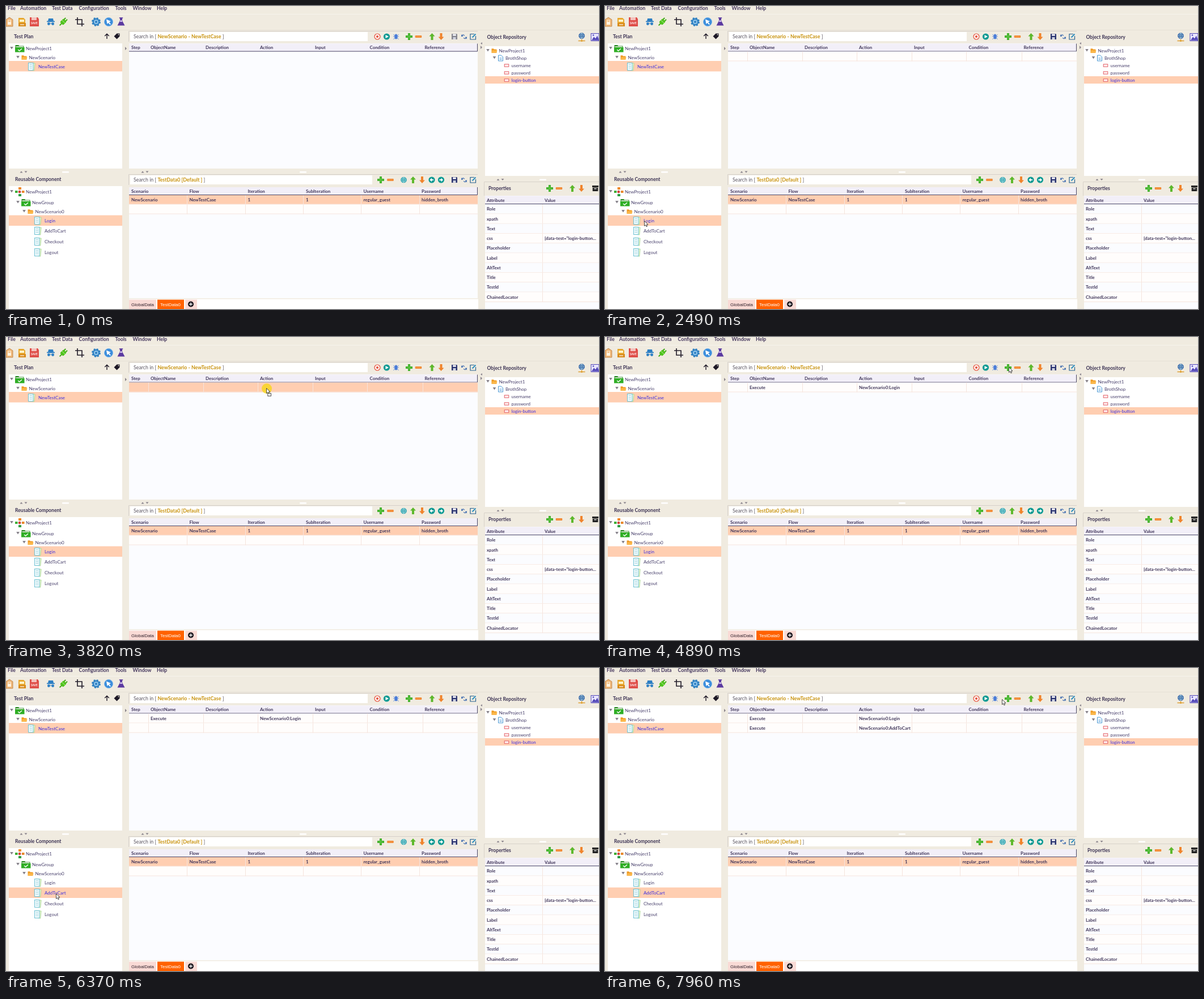
Animation, 1046 px wide and 535 px high, one loop 8000 ms. Source, as an HTML page:

```html
<!DOCTYPE html>
<html lang="en">
<head>
<meta charset="utf-8">
<title>Test designer</title>
<style>
html, body { margin: 0; width: 100%; height: 100%; overflow: hidden; background: #f0ebe0; }
svg { display: block; width: 1046px; height: 535px; font: 8px Lato, "Open Sans", sans-serif; }
text { fill: #473f6b; white-space: pre; }
.b { font-weight: 700; font-size: 7.9px; fill: #40365a; }
.menu { font-weight: 700; font-size: 8.7px; fill: #43355c; }
.head { font-weight: 700; font-size: 8.6px; fill: #3c3354; }
.find { font-size: 8.8px; fill: #5a5560; }
.find tspan { font-weight: 700; fill: #c8920c; }
.on { fill: #3a2ee0; }
.tab { font: 8px "Liberation Sans", Arial, sans-serif; fill: #33222c; }
.tab.hot { fill: #fff; }

.anim { animation: 8s step-end infinite; }
#pointer { animation-name: move; }
#drag { animation-name: drag; }
#badge { animation-name: badge; }
#saveOff { animation-name: saveOff; }
#row1 { animation-name: row1; }
#row2 { animation-name: row2; }
#drop1 { animation-name: drop1; }
#drop2 { animation-name: drop2; }
#call1 { animation-name: call1; }
#call2 { animation-name: call2; }
#pick1 { animation-name: pick1; }
#pick2 { animation-name: pick2; }

@keyframes move {
  0% { transform: translate(1100px, 600px); }
  6.5% { transform: translate(991px, 512px); }
  7.375% { transform: translate(752px, 167px); }
  9.5% { transform: translate(691px, 78px); }
  12.125% { transform: translate(692px, 53px); }
  14.125% { transform: translate(717px, 53px); }
  18.5% { transform: translate(714px, 53px); }
  20.75% { transform: translate(713px, 53px); }
  23.75% { transform: translate(127px, 386px); }
  31.125% { transform: translate(69px, 379px); }
  39.125% { transform: translate(71px, 379px); }
  40.75% { transform: translate(374px, 165px); }
  43.125% { transform: translate(419px, 108px); }
  45.625% { transform: translate(451px, 97px); }
  47.75% { transform: translate(459px, 90px); }
  52.125% { transform: translate(520px, 82px); }
  53.5% { transform: translate(606px, 62px); }
  55.75% { transform: translate(668px, 57px); }
  57% { transform: translate(703px, 54px); }
  58.25% { transform: translate(712px, 53px); }
  66.125% { transform: translate(371px, 176px); }
  68.375% { transform: translate(252px, 264px); }
  69.375% { transform: translate(180px, 317px); }
  71.25% { transform: translate(150px, 345px); }
  72.5% { transform: translate(125px, 366px); }
  73.75% { transform: translate(107px, 383px); }
  75% { transform: translate(96px, 393px); }
  76.375% { transform: translate(90px, 397px); }
  77.75% { transform: translate(88px, 398px); }
  80.875% { transform: translate(90px, 398px); }
  81.75% { transform: translate(318px, 236px); }
  82.875% { transform: translate(447px, 145px); }
  87.5% { transform: translate(480px, 106px); }
  93.5% { transform: translate(497px, 104px); }
  94.6% { transform: translate(561px, 88px); }
  95.75% { transform: translate(628px, 72px); }
  97% { transform: translate(672px, 61px); }
  98.25% { transform: translate(693px, 56px); }
  99.5%, 100% { transform: translate(700px, 55px); }
}
@keyframes drag {
  0%, 50.75%, 92.375%, 100% { opacity: 0; }
  39.125%, 80.875% { opacity: 1; }
}
@keyframes badge {
  0%, 50.75%, 92.375%, 100% { opacity: 0; }
  40.75%, 81.75% { opacity: 1; }
}
@keyframes saveOff { 0% { opacity: 1; } 23.75%, 100% { opacity: 0; } }
@keyframes row1 { 0% { opacity: 0; } 23.75%, 100% { opacity: 1; } }
@keyframes row2 { 0% { opacity: 0; } 62.75%, 100% { opacity: 1; } }
@keyframes drop1 { 0%, 52.125%, 100% { opacity: 0; } 47.75% { opacity: 1; } }
@keyframes drop2 { 0%, 93.5%, 100% { opacity: 0; } 87.5% { opacity: 1; } }
@keyframes call1 { 0% { opacity: 0; } 50.75%, 100% { opacity: 1; } }
@keyframes call2 { 0% { opacity: 0; } 92.375%, 100% { opacity: 1; } }
@keyframes pick1 { 0% { opacity: 1; } 79.625%, 100% { opacity: 0; } }
@keyframes pick2 { 0% { opacity: 0; } 79.625%, 100% { opacity: 1; } }
</style>
</head>
<body>
<svg id="stage" viewBox="0 0 1046 535"></svg>
<script>
const PEACH = '#ffceb1', GRID = '#f5e4dd', BLANK = '#fbfcff', ROW = '#fffdfc';
const GREEN = '#3fae2a', ORANGE = '#f0842c', TEAL = '#0c9a93', BLUE = '#2d7fc4', NAVY = '#2b3470';

const rect = (x, y, w, h, fill, more = '') =>
  `<rect x="${x}" y="${y}" width="${w}" height="${h}" fill="${fill}" ${more}/>`;
const path = (d, fill, more = '') => `<path d="${d}" fill="${fill}" ${more}/>`;
const line = (d, stroke, w = 1, more = '') =>
  `<path d="${d}" fill="none" stroke="${stroke}" stroke-width="${w}" ${more}/>`;
const dot = (x, y, r, fill, more = '') => `<circle cx="${x}" cy="${y}" r="${r}" fill="${fill}" ${more}/>`;
const text = (x, cy, s, cls = '') => `<text x="${x}" y="${cy + 2.8}" class="${cls}">${s}</text>`;
const part = (id, body) => `<g id="${id}" class="anim">${body}</g>`;
const at = (x, y, body) => `<g transform="translate(${x} ${y})">${body}</g>`;
const turn = (deg, body) => `<g transform="rotate(${deg})">${body}</g>`;

const arrow = (dir, color) => path('M0-6L5-.5H2V6H-2V-.5H-5Z', color, `transform="scale(1 ${dir})"`);
const disc = deg => dot(0, 0, 5.6, TEAL) + turn(deg, path('M-3-1H0V-3.5L3.5 0L0 3.5V1H-3Z', '#fff'));
const floppy = c => path('M-5-5H4L5-4V5H-5Z', c) + rect(-2.8, -4.5, 5.6, 3.2, '#f4f4fa') + rect(-2.5, 1, 5, 4, '#cfd2e0');
const globe = c => dot(0, 0, 5.3, c) +
  line('M-5 0H5M0-5V5M-4-2.8H4M-4 2.8H4M0-5C-4-2-4 2 0 5C4 2 4-2 0-5', '#c9f0ef', .6);

const icons = {
  plus: path('M-2-6H2V-2H6V2H2V6H-2V2H-6V-2H-2Z', GREEN) + line('M-4.5 0H4.5M0-4.5V4.5', '#66cc4c', 1.2),
  minus: rect(-5.7, -2, 11.4, 4, ORANGE, 'rx=".8"') + line('M-4.5 0H4.5', '#f8a75c', 1),
  up: arrow(1, '#5db82c'),
  down: arrow(-1, ORANGE),
  left: disc(180),
  right: disc(0),
  record: dot(0, 0, 5, '#fff3ef', 'stroke="#e4503c" stroke-width="1.2"') + dot(0, 0, 2, '#e4503c'),
  play: dot(0, 0, 5.6, TEAL) + path('M-2-3L3.5 0L-2 3Z', '#fff'),
  bug: line('M-4.5-4L-2-1M4.5-4L2-1M-5 0H5M-4.5 5L-2 2M4.5 5L2 2', '#5585dd', .9) +
    '<ellipse rx="2.6" ry="4.5" fill="#4a7cd8"/>',
  save: floppy(NAVY),
  saveOff: floppy('#85858e'),
  refresh: line('M-3.8-1C-3.5-4-.5-3.5 .8-1.5M3.8 1.5C3.5 4.5 .5 4-.8 2', '#3a68ae', 1.2) +
    path('M-4.5-4L-1.5-.5L-5 0ZM4.5 4.5L1.5 1L5 .5Z', '#3a68ae'),
  edit: line('M2-4.5H-5V5H4.5V-1', '#27618f', 1.2) + line('M-1.5 1.5L4.5-4.5', '#2e8fc0', 2),
  globe: globe('#1c98a8'),
  web: at(0, -2, globe('#1e4f9c')) + line('M0 4V7M-6 7H6', '#e0a030', 1.4) + dot(0, 7, 1.5, '#e0a030'),
  picture: rect(-6, -6, 14, 13, '#e9e6ff', 'stroke="#5247b8"') + path('M-5 6L-1 0L2 3L5-2L8 6Z', '#5247b8') + dot(-2, -3, 1.3, '#5247b8'),
  archive: rect(-5.5, -5, 11, 3, '#222') + rect(-4.8, -1.3, 9.6, 6.3, '#222') + rect(-2, 0, 4, 1.3, '#fff'),
  folder: path('M-4.5-3.8H-1L0-2.6H4.5V3.8H-4.5Z', '#ef9a22') + path('M-3-.8H5.5L4 3.8H-4.5Z', '#fbb74a'),
  project: path('M-7.5-6H-2L-.5-4.5H7.5V6H-7.5Z', '#23861c') + rect(-6.5, -3.8, 13, 1.6, '#e9f5e4') +
    rect(-8, -2, 16.5, 8.5, '#2fae25') + line('M-2.8 2L-.5 4.2L4 .2', '#fff', 1.4),
  sheet: turn(6, rect(-3.5, -6.5, 9, 13, '#e6f5d3', 'stroke="#9bd283" stroke-width=".7"')) +
    rect(-5.5, -6.5, 8.5, 13, '#f1fafc', 'stroke="#62bdd2" stroke-width=".9"') +
    line('M-3.5-3.5H1M-3.5-.5H1M-3.5 2.5H1', '#8ccbd9', .8),
  page: path('M-4-5H1L4-2V5H-4Z', '#f4faff', 'stroke="#3b8fd0" stroke-width=".9"') + line('M-2 0H2M-2 2.5H2', '#3b8fd0', .8),
  field: rect(-3.8, -2.2, 7.6, 4.4, '#ffeeee', 'stroke="#e0515a" stroke-width=".9"'),
  cluster: line('M0-4V5M-4 0H5', '#aaa', .7) + rect(-2, -8, 5, 4, '#ef8a2a') + rect(-8, -2, 4.5, 4, '#3cae35') +
    rect(-2, -2, 4, 4, '#d8433c') + rect(4, -2, 4.5, 4, '#e9892c') + rect(-2, 4, 5, 4, '#2f9e43'),
  tri: path('M-2.8-2H2.8L0 2.5Z', '#858089'),
  lockDoc: path('M-6-4L0-8L6-4V8H-6Z', '#efb778', 'stroke="#b97a3c" stroke-width=".8"') +
    rect(-3, 0, 6, 5, '#fff3df') + line('M-2 0V-3H2V0', '#fff3df', 1.2),
  openDoc: path('M-6-7H3L6-4V8H-6Z', '#e8a82e') + rect(-4, -4, 8, 4, '#fff3c8') + rect(-6, 2, 13, 6, '#d98c1c') + line('M-3 5H4', '#fff', 1.2),
  saveAll: path('M-8-8H6L8-5V8H-8Z', '#df4f49') + rect(-5, -8, 9, 5, '#f3c2bd') +
    '<text x="-6" y="4" style="font:700 4.8px Lato,sans-serif;fill:#fff">SAVE</text>',
  spy: path('M-4-6H4L5-1H-5Z', BLUE) + rect(-7, -1.5, 14, 1.8, BLUE) + dot(-3.6, 3.5, 2.4, BLUE) + dot(3.6, 3.5, 2.4, BLUE) + line('M-2 3H2', BLUE),
  plug: turn(45, rect(-4, -4.5, 8, 9, '#4fc41c', 'rx="2"') + line('M-4-.5H4', '#d6f3c6', .8) +
    line('M-2-8V-4M2-8V-4M0 4V9', '#41ab18', 2)),
  crop: line('M-4-8V4H8M-8-4H4V8', '#211c28', 1.6),
  gear: dot(0, 0, 6.4, '#2f80c2', 'stroke="#2f80c2" stroke-width="3" stroke-dasharray="2.8 2.23"') +
    dot(0, 0, 4, '#8fc4ea') + dot(0, 0, 2, '#2f80c2'),
  pointer: dot(0, 0, 7.6, '#3b8ddb', 'stroke="#82b9ea" stroke-width=".9"') +
    path('M-4-4.5L4-1L1 .5L4 4L2.5 5L-.5 1.8L-2.5 4Z', '#fff'),
  flask: path('M-2-7H2V-2L6.5 6.5H-6.5L-2-2Z', '#5b3aa0') + line('M-3.2-7H3.2', '#5b3aa0', 1.6) + path('M-1-3H1L2 0H-2Z', '#d9c9f2'),
  back: line('M0 4.5V-4M-3.8-.5L0-4.3L3.8-.5', '#1d1826', 1.4),
  tag: path('M-5 0L0-5H5V0L0 5Z', '#1d1826') + dot(3, -3, .9, '#f0ebe0'),
  add: dot(0, 0, 5, '#17131c') + line('M-3 0H3M0-3V3', '#fff', 1.3)
};
const icon = (name, x, y) => at(x, y, icons[name]);
const iconRow = (y, list) => Object.entries(list).map(([name, x]) => icon(name, x, y)).join('');

const label = (cls, y, list) => list.map(([x, s]) => text(x, y, s, cls)).join('');
const splitter = (x, y, handle) =>
  path(`M${x - 2.5} ${y + 1.5}h5l-2.5-3zM${x + 5.5} ${y - 1.5}h5l-2.5 3z`, '#8a848c') +
  rect(handle, y - 1, 12, 2.4, '#fff', 'rx="1"');
const gridRow = (y, h, cols, fill) =>
  rect(217, y, 615, h, fill) + line(`M217 ${y + h - .5}H832` + cols.map(x => `M${x} ${y}V${y + h}`).join(''), GRID);
const tableHead = (y, cols) =>
  rect(217, y, 615, 14, '#f2eff8') + line(`M217 ${y + 13.5}H831.5V${y}`, '#4a4766') +
  label('b', y + 7, cols);
const search = (y, w, name) =>
  line(`M216.5 ${y + 17}V${y - 1.5}H832`, '#d5cfca') + rect(219, y, w, 16, '#fff') +
  text(225, y + 8, `Search in [ <tspan>${name}</tspan> ]`, 'find');

// Distance from an icon to its label and to its expander.
const labelGap = { project: 11, cluster: 11, sheet: 12, folder: 8.5, page: 8.5, field: 8.5 };
const openGap = { project: 14, cluster: 14, folder: 11, page: 11 };
const node = (x, y, kind, s, cls) =>
  (openGap[kind] ? icon('tri', x - openGap[kind], y - 1) : '') + icon(kind, x, y) + text(x + labelGap[kind], y, s, cls);

const stepCols = [251.5, 348.5, 444.5, 541.5, 637.5, 735.5];
const dataCols = [319.5, 422.5, 524.5, 626.5, 729.5];
const call = (y, s) => text(255, y, 'Execute', 'b') + text(448, y, 'NewScenario0:' + s, 'b');

const topBar =
  label('menu', 4.5, [[3, 'File'], [25, 'Automation'], [81, 'Test Data'], [128.5, 'Configuration'], [192.5, 'Tools'], [223.5, 'Window'], [266, 'Help']]) +
  line('M0 14.5H1046', '#f7f4ec') + line('M0 42.5H1046', '#e6e0d5') +
  iconRow(28, { lockDoc: 6, openDoc: 28, saveAll: 50, spy: 79, plug: 101, crop: 130, gear: 159, pointer: 181, flask: 203 });

const testPlan =
  text(14, 54, 'Test Plan', 'head') + iconRow(53.5, { back: 178, tag: 195.5 }) +
  rect(5, 66, 200, 221, '#fff') + rect(5, 97, 200, 18.5, PEACH) +
  node(24, 75, 'project', 'NewProject1') +
  node(32, 91, 'folder', 'NewScenario') +
  node(45, 107, 'sheet', 'NewTestCase', 'on') +
  splitter(27, 293, 99);

const leaf = (y, s, cls) => node(56, y, 'sheet', s, cls);
const picked = (y, s) => rect(5, y - 9.5, 200, 18.5, PEACH) + leaf(y, s, 'on');
const components =
  text(16, 306, 'Reusable Component', 'head') + rect(5, 318, 200, 217, '#fff') +
  node(24, 328, 'cluster', 'NewProject1') +
  node(35, 347, 'project', 'NewGroup') +
  node(43, 363, 'folder', 'NewScenario0') +
  leaf(379, 'Login') + leaf(397, 'AddToCart') + leaf(416, 'Checkout') + leaf(435, 'Logout') +
  part('pick1', picked(379, 'Login')) +
  part('pick2', picked(397, 'AddToCart'));

const steps =
  search(46, 419, 'NewScenario - NewTestCase') +
  iconRow(54, { record: 655, play: 671.5, bug: 688, plus: 711, minus: 727.5, up: 751.5, down: 767.5, save: 791, refresh: 808, edit: 824 }) +
  part('saveOff', rect(785, 48, 12, 12, '#f0ebe0') + icon('saveOff', 791, 54)) +
  rect(217, 66, 615, 221, BLANK) +
  tableHead(66.5, [[221, 'Step'], [255, 'ObjectName'], [352, 'Description'], [448, 'Action'], [545, 'Input'], [641.5, 'Condition'], [738.5, 'Reference']]) +
  part('row1', gridRow(80.5, 17, stepCols, ROW)) +
  part('row2', gridRow(97.5, 17, stepCols, ROW)) +
  part('drop1', gridRow(80.5, 17, stepCols, PEACH)) +
  part('drop2', gridRow(97.5, 17, stepCols, PEACH)) +
  part('call1', call(89, 'Login')) + part('call2', call(106.5, 'AddToCart')) +
  splitter(241, 293, 518) + path('M210 72l3 3l-3 3zM837 70l3 3l-3 3zM840 64l-3 2l3 2z', '#8a848c');

const testData =
  search(299, 427, 'TestData0 [Default ]') +
  iconRow(307, { plus: 661, minus: 678, globe: 701.5, up: 718, down: 734, left: 751, right: 767.5, save: 791, refresh: 808, edit: 824 }) +
  rect(217, 320, 615, 196, BLANK) +
  tableHead(320, [[221, 'Scenario'], [323.5, 'Flow'], [426.5, 'Iteration'], [529, 'SubIteration'], [630.5, 'Username'], [733, 'Password']]) +
  gridRow(334, 16.5, dataCols, PEACH) + gridRow(350.5, 17, dataCols, ROW) +
  label('b', 342, [[221, 'NewScenario'], [323.5, 'NewTestCase'], [426.5, '1'], [529, '1'], [630.5, 'regular_guest'], [733, 'hidden_broth']]) +
  rect(217, 517.5, 616, 18, '#fff') + rect(217, 518.5, 48, 17, '#f9dad5') + rect(267, 518.5, 47, 17, '#ff6200') + rect(316, 518.5, 21, 17, '#f9dad5') +
  text(221, 527, 'GlobalData', 'tab') + text(272, 527, 'TestData0', 'tab hot') + icon('add', 326, 526.5);

const repository =
  text(848.5, 55, 'Object Repository', 'head') + iconRow(54.5, { web: 1015.5, picture: 1038 }) +
  rect(845, 71, 201, 229, '#fff') + rect(845, 124, 201, 13, PEACH) +
  node(861, 79, 'folder', 'NewProject1') +
  node(872.5, 92, 'page', 'BrothShop') +
  node(883, 105, 'field', 'username') +
  node(883, 118, 'field', 'password') +
  node(883, 131, 'field', 'login-button', 'on') +
  splitter(868, 306.5, 941);

const names = ['Role', 'xpath', 'Text', 'css', 'Placeholder', 'Label', 'AltText', 'Title', 'TestId', 'ChainedLocator'];
const properties =
  line('M843.5 335V310.5H1046', '#d8d2ca') + text(851, 322.5, 'Properties', 'head') +
  iconRow(322, { plus: 959, minus: 975.5, up: 999, down: 1015, archive: 1039.5 }) +
  rect(845, 335, 201, 200, BLANK) + rect(845, 335.5, 201, 14, '#f2eff8') + line('M845 349.5H1046', '#4a4766') +
  label('b', 343, [[848, 'Attribute'], [950, 'Value']]) +
  names.map((s, i) => {
    const y = 350 + i * 17.25;
    return rect(845, y, 201, 17.25, i % 2 ? ROW : BLANK) + line(`M845 ${y + 17}H1046M946.5 ${y}V${y + 17}`, GRID) + text(848, y + 8.6, s, 'b');
  }).join('') +
  text(950, 410.3, '[data-test="login-button...', 'b');

const pointer = part('pointer',
  part('drag', dot(1, 1, 9, '#f7d70a', 'fill-opacity=".72"')) +
  path('M.5 .5V9.5L2.6 7.6L4 10.8L5.5 10.1L4.1 7H7Z', '#fff', 'stroke="#222" stroke-width=".8"') +
  part('badge', rect(2.8, 9.6, 5.6, 4.6, '#fff', 'stroke="#333" stroke-width=".9"')));

document.getElementById('stage').innerHTML =
  topBar + testPlan + components + steps + testData + repository + properties + pointer;
</script>
</body>
</html>
```
